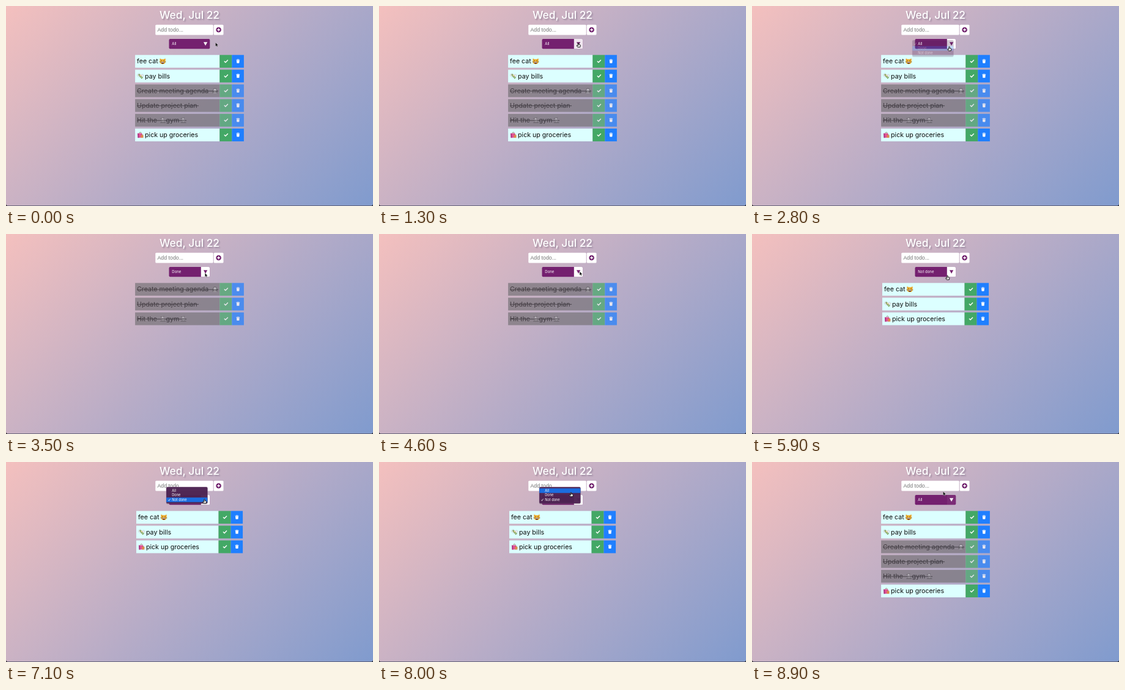
An HTML page for the animation above (9 s loop, 600 by 328 pixels).

```html
<!DOCTYPE html>
<html lang="en">
<head>
<meta charset="utf-8">
<title>Todo list</title>
<style>
  html, body { margin: 0; width: 100%; height: 100%; overflow: hidden; }
  body { background: linear-gradient(135deg, #f4c0be, #b7acc7 52%, #809bce); }
  svg { display: block; width: 600px; height: 328px; }
  text { font-family: Inter, sans-serif; }
  .title { font-size: 17.4px; font-weight: 500; fill: #fff; text-shadow: 2px 2px 2px rgba(70, 60, 90, .3); }
  .item { font-size: 10.6px; fill: #0b0b0b; }
  .small { font-size: 6px; fill: #fff; }
  .option { font-size: 5.6px; fill: #fff; }
  .input { font: 8.8px "Liberation Sans", sans-serif; fill: #757575; }
  .done { opacity: .7; }
</style>
</head>
<body>
<svg viewBox="0 0 600 328">
  <defs>
    <g id="check"><path d="M-3 .1L-.9 2.2 3-1.9" fill="none" stroke="#fff" stroke-width="1.4"/></g>
    <g id="trash" fill="#fff">
      <path d="M-2.9-2.7h1.8l.4-.6h1.4l.4.6h1.8v.8h-5.8zM-2.4-1.5h4.8l-.3 4.1q0 .7-.7.7h-2.8q-.7 0-.7-.7z"/>
    </g>
    <g id="cat">
      <path d="M-4.6-4.8L-1.6-3.4H1.6L4.6-4.8 4.7 1Q4 4.6 0 4.6T-4.7 1z" fill="#f3b530"/>
      <path d="M-4-3.6l1.5.9-1.3 1.3zM4-3.6l-1.5.9 1.3 1.3z" fill="#d98335"/>
      <path d="M-3 .9h6Q2.500 4 0 4T-3 .9z" fill="#5a2b1c"/>
      <path d="M-2.700 1h5.400l-.4 1h-4.600z" fill="#fff"/>
      <path d="M-2.900-.5q.9-1.500 1.800 0M1.100-.5q.9-1.500 1.800 0M-5.300 1h1.700M5.300 1h-1.700" fill="none" stroke="#41301c" stroke-width=".7"/>
    </g>
    <g id="money">
      <path d="M-5-.5Q-5.300-4.300-1.500-4L1-1-1.700 2zM2-2.500Q5.500-4 5.200-.3L3.500 2 1 0z" fill="#e9edf0" stroke="#a9b4bd" stroke-width=".4"/>
      <path d="M-3.600-2.200L-1.600-3.700 4.400 2.600 2 4.600z" fill="#79a15c"/>
      <path d="M-1.500-1.300L.1-2.500 2.100-.3.500 1z" fill="#e6cf9b"/>
      <circle cx="1.900" cy="2" r=".9" fill="#c7dcae"/>
    </g>
    <g id="bags">
      <path d="M-1.500-2.500v-1.200q1.400-1.800 2.800 0v1.200" fill="none" stroke="#7c5a42" stroke-width=".7"/>
      <path d="M-4.500-2.600H2.800L3.400 4.300-4 4.700z" fill="#e45495"/>
      <path d="M-4.500-2.600L-2.500-1.800-2 4.600-4 4.700z" fill="#a83a86"/>
      <path d="M.8.100H4.900V4.500L1 4.800z" fill="#d98b4d"/>
      <path d="M1.900.100q1-2.300 2 0" fill="none" stroke="#7c4a2a" stroke-width=".6"/>
    </g>
    <g id="person">
      <path d="M-4.600 3.900Q-4-4.600 0-4.600T4.600 3.900z" fill="#555"/>
      <ellipse cy="-.6" rx="2.300" ry="2.600" fill="#bbb"/>
      <path d="M-3.800 4.200q3.800-3 7.600 0z" fill="#999"/>
    </g>
    <g id="lifter">
      <path d="M-4.500-2.800L2-4M-1-2.600L0 0 2.800 3.800M0 0L-2.800 3.800" fill="none" stroke="#505050" stroke-width="1"/>
      <circle cx="-.6" cy="-2.200" r="1.300" fill="#bbb"/>
      <path d="M-2-.6h3.800l.7 2.600h-4.500z" fill="#aaa"/>
      <path d="M-4.500 4h9" stroke="#444" stroke-width="1"/>
    </g>
  </defs>

  <text class="title" x="300" y="21" text-anchor="middle">Wed, Jul 22</text>
  <rect x="244.300" y="30.800" width="94.400" height="16.600" rx="1.500" fill="#fff"/>
  <text class="input" x="247.500" y="42.300">Add todo...</text>
  <rect x="339.700" y="30.800" width="15.800" height="16.600" rx="1.500" fill="#fff"/>
  <circle cx="347.600" cy="39" r="4.300" fill="#6f1f6c"/>
  <path d="M345.200 39h4.800M347.600 36.600v4.800" stroke="#fff" stroke-width="1.300"/>

  <rect x="266.500" y="54" width="66.800" height="16.200" rx="2" fill="#74206f"/>
  <path id="arrowCell" d="M318.800 54h12.500q2 0 2 2v12.200q0 2-2 2h-12.500z" fill="#fff"/>
  <text id="chosen" class="small" x="271.300" y="64.200"></text>
  <path id="arrow" d="M323 59.200h6.200L326.100 65z"/>

  <g id="lists"></g>
  <path d="M0 327.600H600" stroke="#56566a" stroke-width=".9"/>
  <path d="M0 325v3h3q-2.600-.2-3-3zM600 325v3h-3q2.600-.2 3-3z" fill="#222"/>

  <g id="menu">
    <rect x="262" width="67.500" height="27" rx="2" fill="#000" opacity=".14" transform="translate(0 1.500)"/>
    <rect x="262" width="67.500" height="27" rx="2" fill="#4d2352" fill-opacity=".96" stroke="#85698a" stroke-width=".4"/>
    <rect id="highlight" x="262.200" width="67.100" height="7.500" fill="#1b6de0"/>
    <g id="options"></g>
    <path id="tick" d="M265.300 0l1.200 1.400 2-3.300" fill="none" stroke="#fff" stroke-width=".8"/>
  </g>

  <g id="cursor">
    <path id="pointer" d="M0 0V6.200L1.500 4.900 2.500 7 3.500 6.500 2.600 4.500H4.500z" fill="#111" stroke="#ddd" stroke-width=".35"/>
    <path id="hand" d="M-.7.4Q0-.5.7.4V2.700L2.900 3.200Q3.500 3.400 3.400 4.200L2.800 7H-1.200L-2.900 4.600Q-2.900 3.500-1.800 4L-.7 4.800z" fill="#e8e8e8" stroke="#111" stroke-width=".9"/>
  </g>
</svg>
<script>
const $ = id => document.getElementById(id);
const LOOP = 9000, STEP = 100, ROW = 24.15, OPTION = 7.5, PAD = 2.25;
const labels = ["All", "Done", "Not done"];

// Each part is [x offset, text] or [x offset, symbol reference].
const todos = [
  { parts: [[3, "fee cat"], [45, "#cat"]] },
  { parts: [[8.5, "#money"], [16, "pay bills"]] },
  { parts: [[3, "Create meeting agenda"], [130.5, "#person"]], strike: 136 },
  { parts: [[3, "Update project plan"]], strike: 104 },
  { parts: [[3, "Hit the"], [45.5, "#lifter"], [50.5, "gym"], [79, "#lifter"]], strike: 84 },
  { parts: [[8.5, "#bags"], [16, "pick up groceries"]] }
];

const icon = (href, x, y) => `<use href="${href}" x="${x}" y="${y}"/>`;
const box = (x, width, fill) => `<rect x="${x}" width="${width}" height="20.900" fill="${fill}"/>`;

function rowMarkup({ parts, strike }, index, left, width) {
  const content = parts.map(([x, value]) => value[0] === "#"
    ? icon(value, x, 10.4)
    : `<text class="item" x="${x}" y="14.100">${value}</text>`).join("");
  const line = strike ? `<path d="M3 10.900H${strike}" stroke="#111" stroke-width=".9"/>` : "";
  return `<g class="${strike ? "done" : ""}" transform="translate(${left} ${80.3 + index * ROW})">
    ${box(0, width, strike ? "#777378" : "#dcffff")}
    ${box(width, 20, "#43a866")}${box(width + 20, 19.6, "#1f7fff")}
    ${content}${line}${icon("#check", width + 10.5, 10)}${icon("#trash", width + 30, 10.1)}</g>`;
}

const filters = [() => true, todo => todo.strike, todo => !todo.strike];
$("lists").innerHTML = filters.map((filter, i) => {
  const [left, width] = i === 2 ? [213, 134.5] : [211.1, 138.2];
  return `<g>${todos.filter(filter).map((todo, n) => rowMarkup(todo, n, left, width)).join("")}</g>`;
}).join("");
$("options").innerHTML = labels.map((label, i) =>
  `<text class="option" x="271.300" y="${PAD + i * OPTION + 5.7}">${label}</text>`).join("");

const path = [
  [0, 342.5, 60], [500, 342.5, 60], [1200, 326, 60.5], [1900, 326, 60.5],
  [2400, 322.5, 66.5], [3100, 322.5, 66.5], [3900, 328, 61.5], [4900, 328, 61.5],
  [5400, 319.5, 68], [6000, 319.5, 68], [6600, 325, 61.5], [7000, 325, 61.5],
  [7700, 314, 49.8], [8500, 314, 49.8], [8700, 312.5, 48.5], [9000, 312.5, 48.5]
];
const menus = [
  { open: 1500, close: 2700, selected: 0 },
  { open: 4800, close: 5600, selected: 1 },
  { open: 6900, close: 8200, selected: 2 }
];
const clamp = v => Math.max(0, Math.min(1, v));
const between = (t, a, b) => t >= a && t < b;

function cursorAt(t) {
  const i = path.findIndex(([time]) => time > t);
  const [t0, x0, y0] = path[i - 1], [t1, x1, y1] = path[i];
  const p = (t - t0) / (t1 - t0), e = p * p * (3 - 2 * p);
  return [x0 + (x1 - x0) * e, y0 + (y1 - y0) * e];
}

function drawMenu(t, y) {
  const menu = menus.find(m => between(t, m.open, m.close + 200));
  $("menu").style.display = menu ? "" : "none";
  if (!menu) return;
  const top = 62 - PAD - OPTION * (menu.selected + .5);
  const hovered = Math.max(0, Math.min(2, Math.floor((y - top - PAD) / OPTION)));
  $("menu").setAttribute("transform", `translate(0 ${top})`);
  $("menu").style.opacity = t < menu.close ? 1 : .6 - (t - menu.close) / 300;
  $("highlight").setAttribute("y", PAD + hovered * OPTION);
  $("tick").setAttribute("transform", `translate(0 ${PAD + menu.selected * OPTION + 4})`);
}

function render(t) {
  const [x, y] = cursorAt(t);
  const current = between(t, 2900, 5800) ? 1 : between(t, 5800, 8400) ? 2 : 0;
  [...$("lists").children].forEach((list, i) => list.style.display = i === current ? "" : "none");
  $("chosen").textContent = labels[current];

  const hover = clamp((t - 1050) / 280) * (1 - clamp((t - 8550) / 370));
  $("arrowCell").style.opacity = hover;
  $("arrow").setAttribute("fill", hover > .5 ? "#74206f" : "#fff");

  drawMenu(t, y);
  const isHand = between(t, 1100, 3300) || between(t, 5100, 8500);
  $("hand").style.display = isHand ? "" : "none";
  $("pointer").style.display = isHand ? "none" : "";
  $("cursor").setAttribute("transform", `translate(${x} ${y})`);
}

const start = performance.now();
function tick() {
  const elapsed = (performance.now() - start) % LOOP;
  render(Math.floor(elapsed / STEP) * STEP);
  requestAnimationFrame(tick);
}
tick();
</script>
</body>
</html>
```
